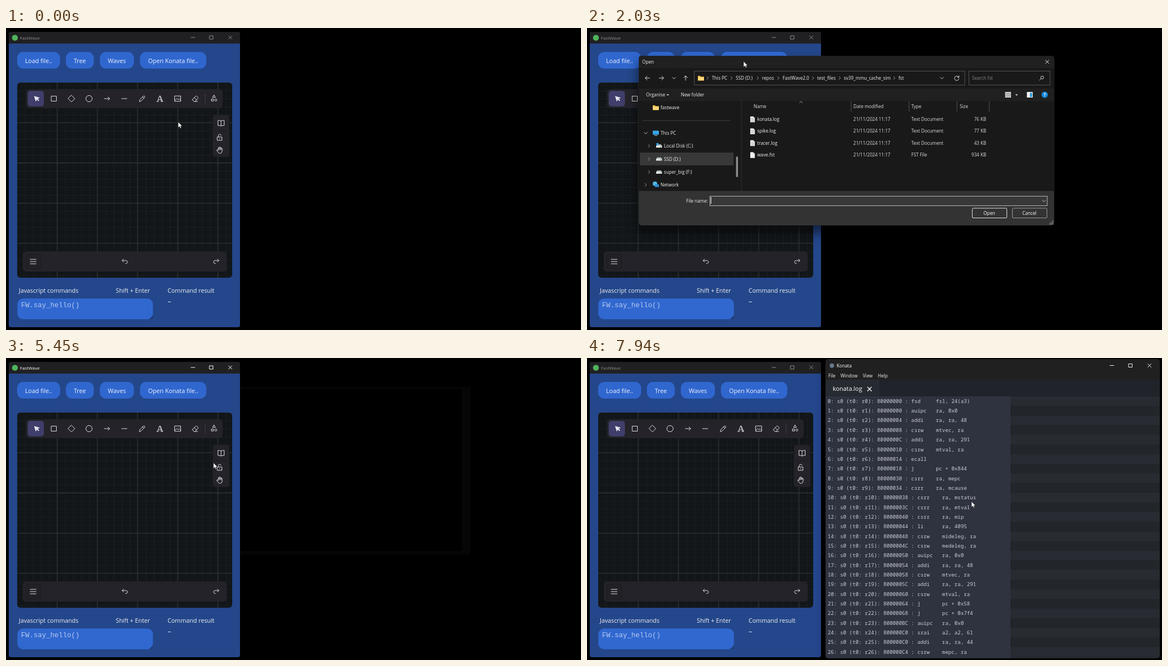
Animation, 1032 px wide and 543 px high, one loop 8 s. Source, as an HTML page:

```html
<!DOCTYPE html>
<html lang="en">
<head>
<meta charset="utf-8">
<title>Opening a log</title>
<style>
html, body { margin: 0; width: 100%; height: 100%; overflow: hidden; background: #000; }
svg { display: block; width: 1032px; height: 543px; }
text { font-family: "Open Sans", "Noto Sans", sans-serif; white-space: pre; }
.mono { font-family: "Liberation Mono", monospace; }
.code { font-family: "Noto Sans Mono", "DejaVu Sans Mono", monospace; }
.scaled { transform-box: view-box; }
#dialog { transform-origin: 466px 202.5px; }
#viewer { transform-origin: 728px 271px; }
</style>
</head>
<body>
<svg viewBox="0 0 1032 543">
  <defs>
    <pattern id="minor" x="19.6" y="98" width="14.45" height="14.45" patternUnits="userSpaceOnUse">
      <path d="M.5 0V14.45M0 .5H14.45" stroke="#22272a" stroke-width="1" stroke-dasharray="2.4 2.4" fill="none"/>
    </pattern>
    <clipPath id="boardClip"><rect x="20" y="98" width="386" height="351" rx="6"/></clipPath>
    <clipPath id="viewerClip"><rect x="428" y="2" width="600" height="538" rx="5"/></clipPath>
  </defs>
  <g id="ghost"></g>
  <g id="app"></g>
  <g id="dialog" class="scaled"></g>
  <g id="viewer" class="scaled"></g>
  <path id="cursor" d="M0 0V10.2L2.4 8L4 11.6L5.7 10.8L4.2 7.4H7.4Z" fill="#fff" stroke="#111" stroke-width=".6"/>
</svg>
<script>
const $ = id => document.getElementById(id);

const box = (x, y, w, h, r, fill, stroke = 'none', sw = 1) =>
  `<rect x="${x}" y="${y}" width="${w}" height="${h}" rx="${r}" fill="${fill}" stroke="${stroke}" stroke-width="${sw}"/>`;
const line = (d, color = '#dedee4', w = 1, fill = 'none') =>
  `<path d="${d}" fill="${fill}" stroke="${color}" stroke-width="${w}" stroke-linecap="round" stroke-linejoin="round"/>`;
const dot = (x, y, r, fill, stroke = 'none', w = 1) =>
  `<circle cx="${x}" cy="${y}" r="${r}" fill="${fill}" stroke="${stroke}" stroke-width="${w}"/>`;
const text = (x, y, s, size = 8.2, fill = '#f0f0f0', extra = '') =>
  `<text x="${x}" y="${y}" font-size="${size}" fill="${fill}" ${extra}>${s}</text>`;
const group = (id, body) => `<g id="${id}">${body}</g>`;
const winButtons = (xs, y, color, w = 1) =>
  line(`M${xs[0] - 3.5} ${y}h7M${xs[1] - 3} ${y - 3}h6v6h-6zM${xs[2] - 3} ${y - 3}l6 6m0-6l-6 6`, color, w);

function drawGhost() {
  return line('M421 51.5H833.5V353H421V347H815Q818 347 818 344V59Q818 56 815 56H421Z', 'none', 0, '#060606');
}

function drawTools() {
  const icons = [
    'M81.5 122.5h9v9h-9z',
    'M117.5 121l6 6l-6 6l-6-6z',
    'M176.5 127h9.5m-3-3l3 3l-3 3',
    'M207.5 127h9.5',
    'M239.5 132l.6-3.2l6.2-6.2q1.4-1 2.4 0q1 1.2 0 2.4l-6.2 6.2zM245 124l2.5 2.5',
    'M270.5 132h3.4M272 132l3.6-9.8h1.4l4 9.8M278 132h3.5M273.3 129h5M276.3 122.4l3.2 9.6',
    'M303 122.2h10.5v9.6H303zM303.2 130l3.3-3.4l2.4 2.3l1.8-1.6l2.6 2.6M310.4 124.8h.2',
    'M334.8 128.5l5.8-6q1-.6 2 .2l2 2q.8 1 0 1.9l-5.4 5.6h-1.8l-2.6-2.4q-.6-.7 0-1.3zM338 125.4l4 3.9M339.2 132.2h4.6',
    'M373.5 120.6l2.4 4.2h-4.8zM369 127.8h3.4v3.4H369z'
  ];
  return box(36, 110, 353, 34, 6, '#232329') + box(39, 113, 29, 28, 5, '#403e6a') +
    line('M51 123.2l2.7 8.2l1.6-3.4l3 3l.9-.9l-3-3l3.4-1.4z', '#fff', .8, '#e8e8f4') +
    icons.map(d => line(d)).join('') + dot(149, 127, 5.6, 'none', '#dedee4') +
    dot(376.6, 129.5, 1.9, 'none', '#dedee4') + line('M357.5 118.5v17', '#3d3d45');
}

function drawBoard() {
  let major = '';
  for (let i = 0; i < 5; i++) major += `M${91.8 + 72.1 * i} 98v351M20 ${170.2 + 72.3 * i}h386`;
  const sidePanel = box(371, 156, 30, 76, 5, '#232329') + box(371.5, 156, 29, 29, 5, '#232329', '#1b1b20') +
    line('M386 167.2q-2.5-1.6-5.6-1v9q3-.6 5.6 1q2.6-1.6 5.6-1v-9q-3-.6-5.6 1zv9') +
    line('M379.5 196h8v6h-8zM381 196v-2.3q.2-2.4 2.5-2.5q1.8.1 2.4 1.8M383.5 198.7v.8') +
    line('M380.8 220v-4.2q.9-1.2 1.7 0v-1.5q.9-1.2 1.8 0v1q.9-1 1.8 0v1.4q1-1 1.9 0v4.3q-.2 4-3.6 4.4h-1.6q-1.6-.4-4.7-5.6q.8-1.4 2.7.2M382.5 215.8v3M384.3 215.5v3.3M386.1 216v2.8');
  const footer = box(30, 402, 366, 36, 6, '#232329') + box(35.5, 406.5, 26.5, 27, 5, '#212126', '#1b1b20') +
    line('M43.5 416h10.5M43.5 420h10.5M43.5 424h10.5') +
    line('M211 415.5l-2.6 2.6l2.6 2.6M208.6 418.1h6.8q2.5.3 2.6 2.5q0 2.6-2.6 2.8h-1') +
    line('M379.5 415.5l2.6 2.6l-2.6 2.6M381.9 418.1h-6.8q-2.5.3-2.6 2.5q0 2.6 2.6 2.8h1');
  return `<g clip-path="url(#boardClip)">${box(20, 98, 386, 351, 0, '#121619')}${box(20, 98, 386, 351, 0, 'url(#minor)')}${line(major, '#2d3132', 1.3)}</g>` +
    drawTools() + sidePanel + footer;
}

function drawApp() {
  const buttons = [[20, 77, 'Load file..'], [107.5, 50, 'Tree'], [168.5, 61, 'Waves'], [240.5, 119, 'Open Konata file..']];
  return box(5, 7, 415, 531, 4, '#24478b') + line('M5 28V11q0-4 4-4h407q4 0 4 4v17z', 'none', 0, '#202023') +
    dot(16, 17.5, 5.3, '#4fb35c') +
    group('appTitle', text(25, 20.5, 'FastWave', 8, 'currentColor') + winButtons([335.5, 368.5, 402.5], 17, 'currentColor')) +
    buttons.map(([x, w, s], i) => `<g id="button${i}">${box(x, 43, w, 30, 11, '#3067cf')}</g>` +
      text(x + w / 2, 62.8, s, 10.8, '#f1f5ff', 'text-anchor="middle"')).join('') +
    drawBoard() +
    text(23, 476, 'Javascript commands', 10.8) + text(197, 476, 'Shift + Enter', 10.8) +
    text(290, 476, 'Command result', 10.8) + line('M291 492.5h4.5', '#dfe6f5') +
    box(20.5, 486.5, 243, 37, 10, '#3168d0', '#2b5cb9') +
    text(27, 502, 'FW.say_hello()', 12.5, '#b5c9ef', 'class="mono"') +
    line('M259 522.5l4-4M261.8 522.7l1.3-1.3', '#15213a');
}

const folder = (x, y) => line(`M${x} ${y - 4}h4l1 1.4h6v7H${x}z`, 'none', 0, '#f3bd45') + box(x, y - 1.5, 11, 5.7, .6, '#ffd976');
const drive = (x, y) => line(`M${x + 1.8} ${y - 2.8}h7l1.8 3h-10.6z`, 'none', 0, '#bfc3c7') + box(x, y, 10.6, 3, .5, '#eceeee') + box(x + 7, y + 1, 2, 1, 0, '#38a356');
const page = (x, y, ruled) => line(`M${x} ${y - 5}h5.5l2.7 2.7v7.8H${x}z`, 'none', 0, '#f1f1f1') +
  (ruled ? line(`M${x + 1.5} ${y - 2}h5m-5 2h5m-5 2h5m-5 2h5`, '#8d8d8d', .6) : line(`M${x + 5.5} ${y - 5}v2.7h2.7`, '#999', .6));
const monitor = (x, y) => box(x, y - 4.5, 11, 7.2, .6, '#36a4e6') + line(`M${x + 3} ${y + 4.2}h5`, '#9ccff0');
const chevron = (x, y) => line(`M${x - 1.3} ${y - 2.6}l2.6 2.6l-2.6 2.6`, '#aaa', .9);
const chevronDown = (x, y, c = '#ccc') => line(`M${x - 2.8} ${y - 1.3}l2.8 2.8l2.8-2.8`, c);
const triangle = (x, y) => line(`M${x - 2.4} ${y - 1}h4.8l-2.4 2.5z`, 'none', 0, '#ddd');

function drawPane() {
  return folder(118, 143) + text(132, 146, 'fastwave') + line('M100 166.5h157', '#3c3c3c') +
    box(95, 224, 168, 23, 0, '#383838') +
    chevronDown(105.5, 189) + monitor(118, 189) + text(132, 192.4, 'This PC') +
    [['Local Disk (C:)', 212], ['SSD (D:)', 235.5], ['super_big (F:)', 259]].map(([s, y]) =>
      chevron(111.5, y) + drive(124, y) + text(138, y + 3.2, s)).join('') +
    box(124.5, 207, 4, 3.6, 0, '#35a8e8') +
    chevron(105.5, 282) + dot(122, 280, 4, '#55b9e8') + box(122, 281, 7, 5, .5, '#2c8bd0') + text(132, 285.2, 'Network') +
    box(267.5, 231, 3.5, 37, 1.5, '#8c8c8c') + line('M277 132v161', '#303030');
}

function drawFiles() {
  const heads = [[299, 'Name'], [478, 'Date modified'], [582, 'Type'], [669, 'Size']];
  const files = [['konata.log', '76 KB'], ['spike.log', '77 KB'], ['tracer.log', '43 KB'], ['wave.fst', '934 KB']];
  return heads.map(([x, s]) => text(x, 144, s, 8.2, '#dedede')).join('') +
    line('M474 132v18M578 132v18M664 132v18M722 132v18', '#555') + line('M381.5 134.5l2.7-2.4l2.7 2.4', '#aaa', .9) +
    group('rowHover', box(288.5, 155, 430.5, 17.5, 0, '#4d4d4d')) +
    files.map(([name, size], i) => {
      const y = 164 + 21.4 * i;
      const log = i < 3;
      return page(293, y, log) + text(305.5, y + 3, name) + text(478, y + 3, '21/11/2024 11:17', 8.2, '#dcdcdc') +
        text(582, y + 3, log ? 'Text Document' : 'FST File', 8.2, '#dcdcdc') + text(716.5, y + 3, size, 8.2, '#dcdcdc', 'text-anchor="end"');
    }).join('');
}

function drawDialog() {
  const crumbs = [[224, 'This PC'], [267, 'SSD (D:)'], [314, 'repos'], [351, 'FastWave2.0'], [413, 'test_files'], [461, 'sv39_mmu_cache_sim'], [559, 'fst']];
  return `<rect x="91" y="60" width="749" height="309" rx="6" fill="#000" opacity=".5" style="filter:blur(9px)"/>` +
    box(93, 50, 745.5, 305, 5, '#333') + line('M93 293V55q0-5 5-5h735.5q5 0 5 5v238z', 'none', 0, '#191919') +
    line('M93 72V55q0-5 5-5h735.5q5 0 5 5v17z', 'none', 0, '#202020') +
    text(99, 64, 'Open') + line('M823 57.7l6 6m0-6l-6 6', '#eee') +
    line('M112.5 90h-8m3.5-3.5l-3.5 3.5l3.5 3.5M129.5 90h8m-3.5-3.5l3.5 3.5l-3.5 3.5M177 94v-8m-3.5 3.5l3.5-3.5l3.5 3.5', '#ddd') + chevronDown(156, 90) +
    box(192.5, 77.5, 485.5, 25, 0, '#191919', '#535353') + box(685.5, 77.5, 145.5, 25, 0, '#191919', '#535353') +
    folder(199, 90) + crumbs.map(([x, s]) => chevron(x - 7.5, 90) + text(x, 93, s)).join('') +
    chevronDown(637, 90) + line('M667 88.2a4 4 0 1 0 .6 2.8M667.6 86v2.7h-2.7', '#ddd') +
    text(691, 93.2, 'Search fst', 8.2, '#858585') + dot(817, 89, 2.6, 'none', '#ccc') + line('M815 91l-3 3', '#ccc') +
    box(93, 109, 745.5, 22.5, 0, '#202020') +
    text(106, 123.2, 'Organise') + triangle(145, 120.3) + text(168.5, 123.2, 'New folder') +
    box(750.5, 115, 10.5, 10, 0, '#ddd') + line('M752 117.5h8m-8 2.5h8m-8 2.5h8', '#555', .8) + triangle(771, 120.3) +
    box(789.5, 115, 10.5, 10, 0, '#f2f2f2') + box(795, 116.5, 4, 7.5, 0, '#2f9be0') +
    dot(821.5, 120, 5.7, '#1688d8') + text(821.5, 123.2, '?', 8.5, '#fff', 'text-anchor="middle" font-weight="bold"') +
    drawPane() + drawFiles() +
    text(217, 314, 'File name:', 8.2, '#eee', 'text-anchor="end"') + box(220.5, 302.5, 605.5, 17, 0, '#383838', '#b8b8b8') + chevronDown(820, 311) +
    group('caret', box(222, 304, 1, 12, 0, '#fff')) +
    box(691.5, 324, 62, 17.5, 1.5, '#333', '#e0e0e0') + text(722, 336, 'Open', 8.2, '#fff', 'text-anchor="middle"') +
    box(763.5, 324, 62, 17.5, 1.5, '#333', '#9b9b9b') + text(794, 336, 'Cancel', 8.2, '#fff', 'text-anchor="middle"') +
    [[0, 0], [-2.6, 0], [-5.2, 0], [0, -2.6], [-2.6, -2.6], [0, -5.2]].map(([x, y]) => box(835 + x, 351.5 + y, 1.5, 1.5, 0, '#aaa')).join('');
}

const listing = `80000000 fsd fs1, 24(a3)
80000000 auipc ra, 0x0
80000004 addi ra, ra, 48
80000008 csrw mtvec, ra
8000000C addi ra, ra, 291
80000010 csrw mtval, ra
80000014 ecall
80000018 j pc + 0x844
80000030 csrr ra, mepc
80000034 csrr ra, mcause
80000038 csrr ra, mstatus
8000003C csrr ra, mtval
80000040 csrr ra, mip
80000044 li ra, 4095
80000048 csrw mideleg, ra
8000004C csrw medeleg, ra
80000050 auipc ra, 0x0
80000054 addi ra, ra, 48
80000058 csrw mtvec, ra
8000005C addi ra, ra, 291
80000060 csrw mtval, ra
80000064 j pc + 0x58
80000068 j pc + 0x7f4
800000BC auipc ra, 0x0
800000C0 srai a2, a2, 61
800000C0 addi ra, ra, 44
800000C4 csrw mepc, ra`.split('\n');

function drawViewer() {
  const rowHeight = 17.346;
  let stripes = '', code = '';
  listing.forEach((entry, i) => {
    const [address, op, ...args] = entry.split(' ');
    const label = `${i}: s0 (t0: r${i}): ${address} : ${op.padEnd(8)}${args.join(' ')}`;
    code += text(432, 80.8 + rowHeight * i, label, 9.26, '#c9ccd2', 'class="code" xml:space="preserve"');
    stripes += box(760, 69 + rowHeight * i, 268, rowHeight + .2, 0, i % 2 ? '#222529' : '#282b31');
  });
  const menu = [[433, 'File'], [455, 'Window'], [495, 'View'], [522, 'Help']];
  return `<rect x="426" y="4" width="604" height="540" rx="6" fill="#000" opacity=".5" style="filter:blur(7px)"/>` +
    `<g clip-path="url(#viewerClip)">` + box(428, 2, 600, 538, 0, '#24282f') + box(428, 2, 600, 37, 0, '#202020') +
    dot(439.5, 13.8, 4, '#66788c') + text(448, 17, 'Konata', 8.2, '#fff') + winButtons([942, 975.5, 1009.5], 13.5, '#f4f4f4') +
    menu.map(([x, s]) => text(x, 34.7, s, 8.2)).join('') +
    group('panels', box(428, 39, 600, 30, 0, '#202329') + box(428, 39, 97, 30, 0, '#262a31') +
      box(428, 69, 332, 471, 0, '#2f3340') + stripes) +
    group('listing', text(441, 59, 'konata.log', 10.9, '#fff') + line('M503.7 52.5l6.6 6.6m0-6.6l-6.6 6.6', '#d5d5d5', 1.7) + code) +
    '</g>' + box(428.5, 2.5, 599, 537, 5, 'none', '#2b2b2b', .6);
}

$('ghost').innerHTML = drawGhost();
$('app').innerHTML = drawApp();
$('dialog').innerHTML = drawDialog();
$('viewer').innerHTML = drawViewer();

// Pointer moves: start, end, number of steps, destination x and y.
const moves = [
  [70, 690, 10, 281, 60], [2220, 2700, 8, 335, 167], [5110, 5870, 12, 434, 224], [5940, 6140, 4, 502, 234],
  [6340, 6620, 5, 643, 261], [6680, 6740, 2, 655, 257.5], [7400, 7740, 6, 690, 258]
];
// Window poses: time, opacity, scale; each is held until the next.
const dialogPoses = [[0, 0, 1], [1830, .35, .96], [1900, .75, .985], [1960, .95, .997], [2030, 1, 1],
  [3630, .85, .984], [3690, .45, .965], [3760, .15, .945], [3830, 0, .94]];
const viewerPoses = [[0, 0, 1], [6680, .45, .94], [6740, 1, .975], [6800, 1, .996], [6870, 1, 1]];

function pointerAt(t) {
  let x = 309, y = 169;
  for (const [start, end, steps, toX, toY] of moves) {
    if (t < start) break;
    const step = Math.min(steps, Math.floor((t - start) / (end - start) * (steps - 1) + .01) + 1);
    const p = step / steps;
    const eased = p * p * (3 - 2 * p);
    x += (toX - x) * eased;
    y += (toY - y) * eased;
  }
  return [x, y];
}

function pose(id, poses, t) {
  const [, opacity, scale] = poses.findLast(p => p[0] <= t);
  const style = $(id).style;
  style.display = opacity ? '' : 'none';
  style.opacity = opacity;
  style.transform = `scale(${scale})`;
}

const within = (t, a, b) => t >= a && t < b;
const show = (id, on) => { $(id).style.display = on ? '' : 'none'; };

function render(t) {
  const [x, y] = pointerAt(t);
  $('cursor').setAttribute('transform', `translate(${x} ${y})`);
  pose('dialog', dialogPoses, t);
  pose('viewer', viewerPoses, t);
  const focused = within(t, 1350, 1490) || within(t, 3560, 6550);
  $('appTitle').style.color = focused ? '#fff' : '#8c8c8c';
  $('button3').style.filter = within(t, 560, 3630) ? 'brightness(1.03)' : '';
  show('rowHover', t >= 2630);
  show('caret', t < 2370 || within(t, 2900, 3430));
  show('ghost', t >= 3760);
  show('panels', t >= 6870);
  show('listing', t >= 7940);
}

const began = performance.now();
function tick() {
  render((performance.now() - began) % 8000);
  requestAnimationFrame(tick);
}
tick();
</script>
</body>
</html>
```
